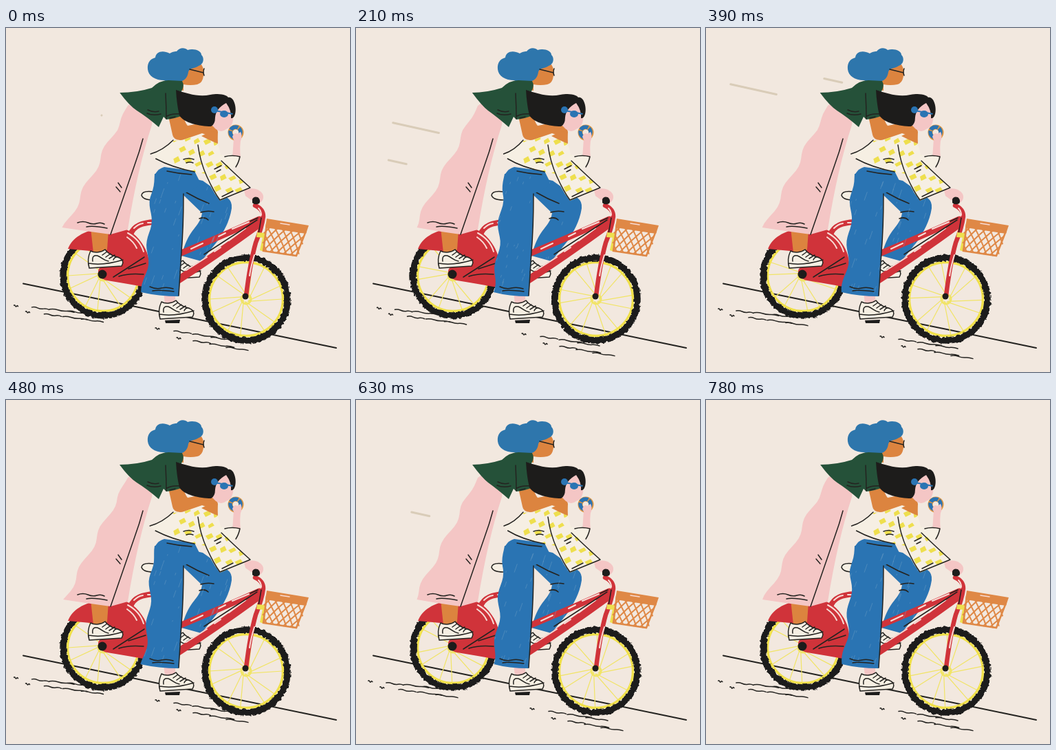
These frames come from a looping animation (500x500 px, 0.85 s). An HTML page:

```html
<!DOCTYPE html>
<html lang="en">
<head>
<meta charset="utf-8">
<title>Bike ride</title>
<style>
html, body { margin: 0; width: 100%; height: 100%; overflow: hidden; background: #f2e8df; }
svg { display: block; width: 100vw; height: 100vh; }
.ink { fill: none; stroke: #242320; stroke-width: 1.5; stroke-linecap: round; stroke-linejoin: round; }
.road { stroke-width: 2; }
.tube { fill: none; stroke: #d0333a; stroke-linecap: round; stroke-linejoin: round; }
.shine { fill: none; stroke: #f8dcd6; stroke-width: 2; stroke-linecap: round; }
.red { fill: #d0333a; }
.blue { fill: #2a74b3; }
.hair { fill: #2e76ac; }
.black { fill: #1d1c1b; }
.tan { fill: #dc843f; }
.pink { fill: #f4c6c5; }
.green { fill: #255139; }
.cream { fill: #f6efe3; }
.yellow { fill: #eedf4e; }
.cane { fill: none; stroke: #df8846; }
</style>
</head>
<body>
<svg viewBox="0 0 500 500">
  <defs>
    <filter id="rough" x="-10%" y="-10%" width="120%" height="120%">
      <feTurbulence id="noise" type="fractalNoise" baseFrequency=".2" numOctaves="2" seed="1"/>
      <feDisplacementMap in="SourceGraphic" scale="5" xChannelSelector="R" yChannelSelector="G"/>
    </filter>
    <clipPath id="denim"><path id="denimNear"/><path d="M262 222L300 233L326 256Q328 280 312 305L286 337L257 333L284 272L258 244Z"/></clipPath>
    <clipPath id="cloth"><path id="clothShape"/></clipPath>
    <g id="shoe">
      <path class="cream" d="M226 398C222 406 222 416 224 423L271 420C276 412 270 408 262 406C255 404 250 400 247 396C240 401 231 401 226 398Z"/>
      <path class="ink" d="M226 398C222 406 222 416 224 423L271 420C276 412 270 408 262 406C255 404 250 400 247 396C240 401 231 401 226 398ZM223 416C240 419 260 415 273 411M229 413C228 406 231 404 236 405C243 408 245 412 252 413M243 404l7-5M248 407l7-5M253 409l8-5M259 411C260 408 263 406 266 407"/>
    </g>
  </defs>
  <rect width="500" height="500" fill="#f2e8df"/>
  <g id="wind" stroke="#d9ccb8" stroke-width="3" stroke-linecap="round"></g>
  <path class="ink road" d="M25 371.500L130 393L222 412L350 438L480 465"/>
  <path id="dashes" class="ink"/>

  <g id="rear"></g>

  <!-- far side -->
  <path class="cream" d="M200 239Q216 236 222 240L220 250Q205 252 199 247Q195 242 200 239Z"/>
  <path class="ink" d="M214 238Q198 236 197 243Q199 250 214 250"/>
  <use href="#shoe" x="10" y="-58"/>
  <path class="blue" d="M255 215L286 222L303 234L322 247Q329 252 328 262C325 282 316 296 308 309L284 339L255 331C260 314 264 303 274 291Q284 279 285 269L258 243Z"/>
  <path class="ink" d="M262 239C274 246 282 250 295 255M283 268Q292 265 302 267M281 277Q289 274 294 279"/>

  <!-- frame -->
  <path class="tube" stroke-width="8" d="M181 300C186 287 198 283 216 282"/>
  <path class="shine" d="M186 291Q192 285 199 284M206 283h5"/>
  <path class="red" d="M90 321C97 304 112 296 138 290C162 284 185 293 197 312Q210 330 208 351L205 377Q172 371 147 367Q134 364 134 354Q134 347 144 345Q138 327 122 324Z"/>
  <path class="shine" d="M177 298C190 305 197 315 200 325M176 304Q186 311 190 320"/>
  <path class="ink" d="M156 362L201 333M164 361Q178 356 200 358M178 350L203 342"/>
  <circle class="black" cx="140" cy="358" r="6.500"/>
  <path class="tube" stroke-width="9" d="M238 334Q310 304 368 278"/>
  <path class="tube" stroke-width="11" d="M243 371Q303 332 369 284"/>
  <path class="shine" d="M269 321l17-8M309 303l10-5M329 292l24-10M262 352l30-19M303 325l9-6M324 309l24-18"/>
  <path class="ink" d="M365 279L288 329M355 281l11-5"/>

  <g id="front"></g>

  <path class="tube" stroke-width="6.500" d="M362 258Q374 263 374 274Q372 290 363 312Q355 340 349 389"/>
  <path class="shine" d="M367 262Q371 266 371 272M361 330Q356 346 354 360"/>
  <path class="ink" d="M371 276L367 299"/>
  <circle class="black" cx="348" cy="390" r="4.500"/>

  <!-- basket -->
  <path class="yellow" d="M365 297l12 1l-1 7l-12-1ZM373 304l5 0l-3 21l-6-2Z"/>
  <path class="cane" stroke-width="2.500" d="M379 285L374 324L422 331L436 295"/>
  <path id="weave" class="cane" stroke-width="2"/>
  <path d="M379 277L440 287L436 299L377 290Z" fill="#df8846"/>
  <path class="shine" d="M399 284l13 2" style="stroke-width:1.500"/>

  <!-- back rider -->
  <path class="tan" d="M123 290L127 327Q137 332 147 322L149 294Z"/>
  <use href="#shoe" x="-103" y="-74"/>
  <path id="skirt" class="pink"/>
  <path class="ink" d="M199 161Q194 180 187 199L152 300M160 231l6 7M163 225l5 7"/>
  <path class="ink" d="M104 283Q112 280 119 283T132 284T143 285M117 289Q127 287 147 291"/>
  <path class="tan" d="M254 70L262 59L284 53Q289 61 287 69Q286 80 278 82Q268 84 258 82L258 91L240 89Z"/>
  <path class="hair" d="M206 60C205 50 210 45 217 43C218 34 228 32 238 37C243 34 246 34 248 34C252 28 260 28 264 32C273 29 284 33 284 39C289 44 287 53 280 55C275 59 266 58 265 64C264 73 257 79 250 77C242 80 235 79 230 76C217 76 207 70 206 60Z"/>
  <path class="ink" d="M267 60L287 65M288 59Q286 64 288 69"/>
  <path class="tan" d="M236 128L258 127Q259 136 264 142L296 136Q306 140 308 151L307 168L297 164L288 155Q268 163 253 163Q243 162 242 155Z"/>
  <path id="shirt" class="green"/>
  <path class="ink" d="M232 95Q233 115 233 132M206 119Q214 123 222 121M205 124Q214 128 225 125M234 128Q242 124 254 125M238 131l8-2"/>

  <!-- front rider -->
  <path class="pink" d="M331 160L342 158Q339 173 341 188L329 190Z"/>
  <path class="cream" d="M308 184L341 187L334 202L322 207Z"/>
  <path class="ink" d="M318 187Q329 184 340 187Q338 196 334 202"/>
  <path class="pink" d="M346 236Q357 231 366 235Q375 240 374 247Q373 254 364 255Q356 250 348 244Z"/>
  <path class="black" d="M358 249Q360 244 366 246Q371 250 368 255Q362 258 358 254Z"/>
  <path class="pink" d="M229 385L231 400Q239 404 246 398L246 387Z"/>
  <use href="#shoe"/>
  <path class="black" d="M231 425L253 424L252 429L232 429Z"/>
  <path id="leg" class="blue"/>
  <g clip-path="url(#denim)"><path id="nap" fill="none" stroke="#6f9fc4" stroke-width=".8" opacity=".6"/></g>
  <path class="ink" d="M258 241Q258 290 255 325L251 389M234 208Q252 212 270 213M209 376Q218 380 226 378T243 379M213 382Q222 380 244 383"/>
  <path id="jacket" class="cream"/>
  <path id="patches" class="yellow" clip-path="url(#cloth)"/>
  <path id="seams" class="ink"/>
  <path class="ink" d="M279 170Q282 194 292 216T311 250L355 232Q338 217 313 193M258 191q7-3 15 0M262 196q5-2 10 0M303 205l10-5M306 209l6-3M314 245l16-8"/>
  <path class="tan" d="M284 157L298 150L307 151L308 168Q302 166 296 163Z"/>
  <path class="pink" d="M298 112L323 106L330 124Q332 143 320 147Q313 153 305 147L299 141Z"/>
  <path class="black" d="M247 90C263 95 280 101 297 97C312 94 322 98 323 101C330 98 336 114 333 125Q331 132 327 131Q328 120 320 109Q305 117 304 130Q304 140 298 143C282 143 258 138 252 127Q248 110 247 90Z"/>
  <g class="blue">
    <circle cx="303" cy="119" r="5"/>
    <ellipse cx="317" cy="125" rx="6" ry="5"/>
    <path d="M304 119L330 124L329 126L304 121Z"/>
  </g>
  <circle cx="334" cy="152" r="8" fill="none" stroke="#df9540" stroke-width="7"/>
  <circle cx="333.500" cy="151.500" r="7.500" fill="none" stroke="#2a74b3" stroke-width="5.500" stroke-dasharray="12 1.500"/>
  <path class="pink" d="M329 158Q332 151 336 154L341 151Q344 157 341 164L332 165Z"/>
</svg>
<script>
const $ = id => document.getElementById(id);
const set = (id, d) => $(id).setAttribute('d', d);
const STEP = 30, LAST = 26, LOOP = 850, SWAY = 13.5, TAU = Math.PI * 2;
const range = n => [...Array(n).keys()];

// Deterministic random numbers
const random = seed => () => (seed = (seed * 16807) % 2147483647) / 2147483647;

function buildWheel(id, cx, cy, r) {
  const spokes = range(12).map(i => {
    const a = (i + i % 2 * .3) / 12 * TAU;
    return `M${4 * Math.cos(a + 1)} ${4 * Math.sin(a + 1)}L${(r - 12) * Math.cos(a)} ${(r - 12) * Math.sin(a)}`;
  }).join('');
  $(id).innerHTML = `<g transform="translate(${cx} ${cy})" fill="none">
    <path class="spin" d="${spokes}" stroke="#f1e466" stroke-width="1.2"/>
    <circle r="7" stroke="#f1e466" stroke-width="3"/>
    <circle r="${r - 11.5}" stroke="#f0e04a" stroke-width="3.5"/>
    <circle r="${r - 5}" stroke="#1d1c1b" stroke-width="9.5" filter="url(#rough)"/></g>`;
}
buildWheel('rear', 141, 360, 63);
buildWheel('front', 349, 394, 65);
const spins = document.querySelectorAll('.spin');

// Basket lattice: u runs along the rim, v down the side
const slat = (u, v) => `${379 - 5 * v + (56 - 8 * v) * u} ${288 + 36 * v + 8 * u}`;
let weave = '';
for (let i = -2; i < 5; i++) {
  for (const flip of [0, 1]) {
    const u = v => (i + 2.5 * (flip ? v : 1 - v)) / 5;
    for (let v = 0; v < .99; v += .1) {
      if (u(v) > -.02 && u(v) < 1.02) weave += `M${slat(u(v), v)}L${slat(u(v + .1), v + .1)}`;
    }
  }
}
set('weave', weave);

// Jacket print: a skewed lattice of small tilted patches
const pick = random(407);
set('patches', range(48).map(i => {
  const col = i % 8, row = Math.floor(i / 8);
  const x = 246 + col * 15 + row % 2 * 7 + pick() * 4, y = 159 + row * 16 + col * 2 + pick() * 4;
  return `M${x - 5} ${y - 1}l${6 + pick() * 3} -4l3 ${4 + pick() * 3}l-8 4Z`;
}).join(''));

// Road dashes in two rows, lengths swelling and shrinking along each row
const dashRow = (x, y, slope, gap) => range(4).map(j => {
  const n = 6 + 30 * Math.sin(j / 4.5 * Math.PI), at = x + j * gap;
  return `M${at} ${y + j * gap * slope}q${n / 6} -1 ${n / 3} 1t${n / 3} ${n / 20}t${n / 3} ${n / 20}`;
}).join('');
const road = pose => {
  const x = 21 + 10 * Math.sin((pose - .8) * TAU / 4), y = 403 + pose * 1.7;
  const fx = 217 + pose * 12, fy = 436 + pose * 4;
  return dashRow(x, y, .11, 26) + dashRow(x + 17, y + 9, .14, 27)
    + dashRow(fx, fy, .17, 27) + dashRow(fx + 31, fy + 14, .2, 24);
};

// Pencil texture of the jeans
const nap = pose => {
  const r = random(71 + pose * 913);
  return range(60).map(() => {
    const len = 2 + r() * (pose % 3 ? 5 : 12);
    return `M${200 + r() * 125} ${210 + r() * 170}l${-len * .35} ${len}`;
  }).join('');
};

// Gusts: start step and the point they blow from
const gusts = [[0, 139, 127], [3, 132, 155], [4, 74.5, 198], [9, 114, 99], [10, 199, 79.5], [18, 108, 169]];
const blow = n => 98 / (1 + Math.exp(2.33 * (3.41 - n)));
function drawWind(k) {
  $('wind').innerHTML = gusts.filter(([s]) => k >= s && k < s + 6).map(([s, x, y]) => {
    const head = blow(k - s), tail = blow(k - s - 1.45);
    return `<line x1="${x - head}" y1="${y - head * .22}" x2="${x - tail}" y2="${y - tail * .22}"/>`;
  }).join('');
}

// Fluttering cloth edge: a wave running down from y0 to y1
function flutter(base, y0, y1, k, { amp, length, lag }) {
  return range(31).map(i => {
    const u = i / 30, y = y0 + (y1 - y0) * u;
    const wave = Math.cos(((y - y1) / length - (k - lag) / SWAY) * TAU);
    return `L${(base(u) - amp * Math.min(1, u * 5) * wave).toFixed(1)} ${y.toFixed(1)}`;
  }).join('');
}

function draw(k) {
  const swing = (lag, amp) => -amp * Math.cos((k - lag) / SWAY * TAU);
  const turn = Math.floor((k + .4) / .675), pose = turn % 4;

  set('dashes', road(pose));
  set('nap', nap(pose));
  $('noise').setAttribute('seed', pose + 1);
  spins.forEach(g => g.setAttribute('transform', `rotate(${turn * 7.5})`));
  drawWind(k);

  const edge = flutter(u => 177 - 92 * u, 113, 290, k, { amp: 3.6, length: 57, lag: .3 });
  set('skirt', `M183 109${edge}Q122 296 152 300L177 293Q191 205 212 141L215 112Z`);

  const s = swing(1.5, 2.2);
  set('shirt', `M${167 + s} 94Q190 94 212 87Q223 76 236 76L256 77Q260 84 255 92L249 104L257 127Q245 132 233 133L229 129L222 144Q206 130 ${191 + s / 2} 120Q${181 + s} 113 ${167 + s} 94Z`);

  const calf = flutter(u => 216 - 7 * Math.sin(u * Math.PI) * (1 - u) - 18 * u * u, 212, 384, k, { amp: 2.8, length: 62, lag: 1.9 });
  const leg = `M230 202Q222 204 217 212${calf}Q222 390 251 390Q258 310 258 241L284 228L274 208Z`;
  set('leg', leg);
  set('denimNear', leg);

  const j = swing(1.9, 3.2), tip = 212.3 + j, hem = 219 + j * .6;
  const jacket = `M${tip} 184Q${229 + j / 2} 178 243 164L256 163L285 153L299 158Q310 166 313 190Q338 217 355 232L311 251Q296 232 290 212L275 209Q242 203 ${hem} 190Z`;
  set('jacket', jacket);
  set('clothShape', jacket);
  set('seams', `M243 163Q${229 + j / 2} 178 ${tip} 183M${hem} 190Q242 203 274 209`);
}

let shown = -1;
function tick() {
  const k = Math.min(LAST, Math.floor(performance.now() % LOOP / STEP));
  if (k !== shown) draw(shown = k);
  requestAnimationFrame(tick);
}
tick();
</script>
</body>
</html>
```
